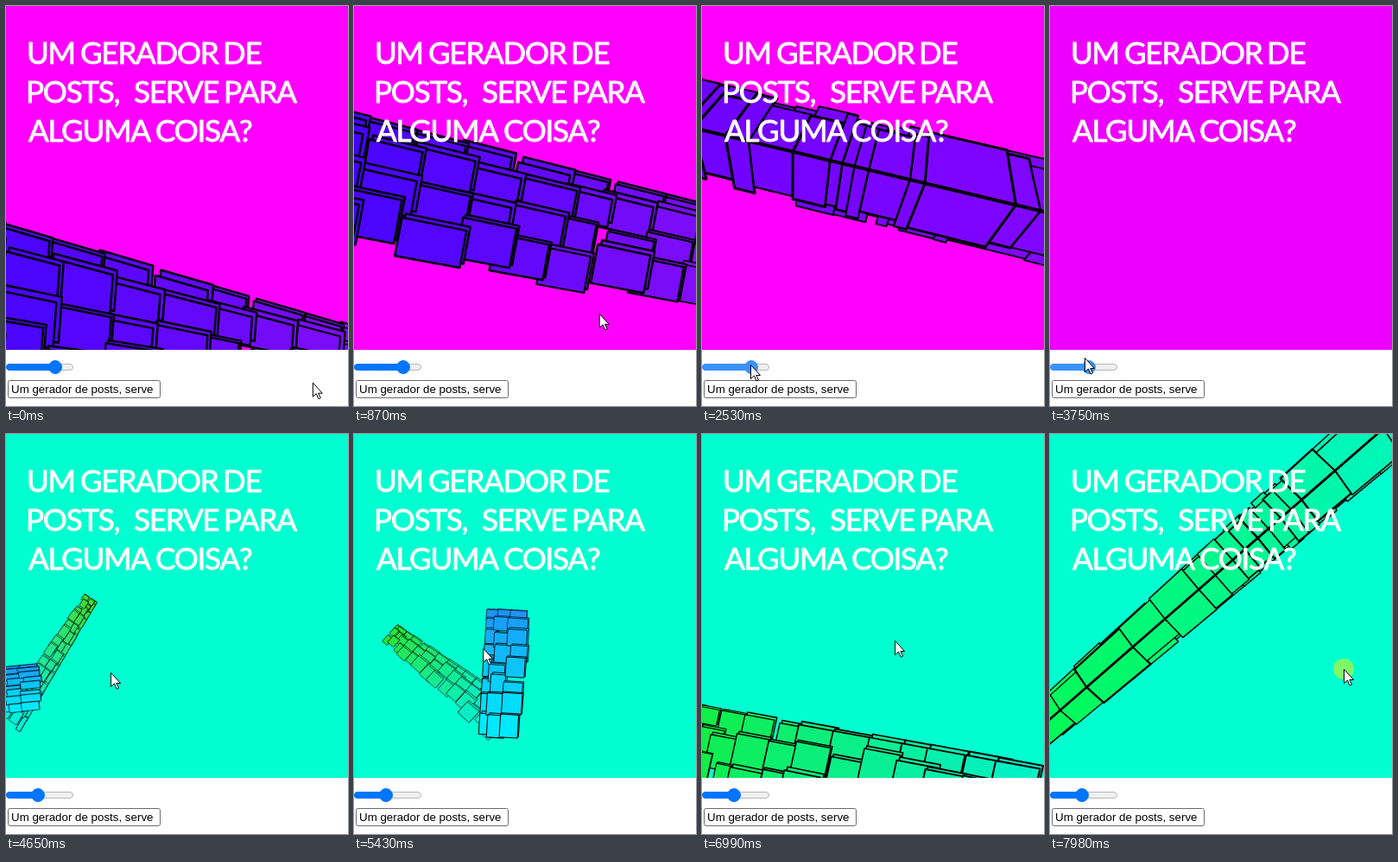
Write an HTML page with a canvas that moves like this. It is 396 by 463 pixels and loops after 8000 ms.

```html
<!DOCTYPE html>
<html lang="pt">
<head>
<meta charset="utf-8">
<title>Gerador de posts</title>
<style>
  html, body { margin: 0; width: 100%; height: 100%; overflow: hidden; background: #fff; }
  canvas { display: block; }
</style>
</head>
<body>
<canvas id="stage" width="396" height="463"></canvas>
<script>
const ctx = document.getElementById('stage').getContext('2d');
const LOOP = 8000, W = 396, H = 398;

const mix = (a, b, k) => a + (b - a) * k;
const mixAll = (a, b, k) => a.map((v, i) => mix(v, b[i], k));
const clamp = (v, lo = 0, hi = 1) => Math.min(hi, Math.max(lo, v));
const ramp = (t, from, to) => clamp((t - from) / (to - from));
const rgb = c => `rgb(${c.map(Math.round)})`;
const rng = s => () => (s = s * 16807 % 2147483647) / 2147483647;

// Keys are [time, ...values]; values are interpolated linearly.
function at(keys, t) {
  const next = keys.findIndex(k => k[0] > t);
  const b = next < 0 ? keys[keys.length - 1] : keys[next];
  const a = next < 0 ? b : keys[Math.max(0, next - 1)];
  return mixAll(a, b, a === b ? 0 : ramp(t, a[0], b[0])).slice(1);
}

function poly(points, fill, width) {
  ctx.beginPath();
  points.forEach(p => ctx.lineTo(...p));
  ctx.closePath();
  ctx.fillStyle = fill;
  ctx.fill();
  ctx.lineWidth = width;
  ctx.strokeStyle = '#000';
  ctx.stroke();
}

// Maps (along, across) to the stage; a pose is an edge and the face width at both ends.
function plane([x0, y0, x1, y1, w0, w1], fan = 0) {
  const length = Math.hypot(x1 - x0, y1 - y0);
  const ax = (x1 - x0) / length, ay = (y1 - y0) / length;
  return (u, v) => {
    const across = mix(w0, w1, u) * v;
    const lean = Math.abs(across) * fan * (0.5 - u);
    return [
      mix(x0, x1, u) - ay * across + ax * lean,
      mix(y0, y1, u) + ax * across + ay * lean
    ];
  };
}

// Wall of jittered boxes that shrink with distance.
function wall(pose, cols, rows, from, to, seed) {
  const rnd = rng(seed), toStage = plane(pose);
  const spread = x => 1 - (1 - clamp(x, -0.1)) ** 1.25;
  const point = (x, y) => toStage(spread(x), spread(y));
  for (let r = rows - 1; r >= 0; r--) {
    for (let c = cols - 1; c >= 0; c--) {
      const x = (c + (rnd() - 0.5) * 0.4) / cols;
      const y = (r + (rnd() - 0.5) * 0.5) / rows;
      const x2 = x + (1 + rnd() * 0.25) / cols;
      const y2 = y + (1 + rnd() * 0.25) / rows;
      const face = [point(x, y), point(x2, y), point(x2, y2), point(x, y2)];
      const size = Math.hypot(face[1][0] - face[0][0], face[1][1] - face[0][1]);
      const lift = size * (0.04 + rnd() * 0.06);
      const back = face.map(p => [p[0] + lift, p[1] - lift]);
      const color = rgb(mixAll(from, to, c / (cols - 1)));
      const line = clamp(size * 0.04, 0.6, 2.5);
      poly(back, color, line);
      poly(face, color, line);
    }
  }
}

// Row of blocks seen on its edge: two faces that share a ridge.
function beam(pose, fan, widest, from, to, seed, line) {
  const rnd = rng(seed), point = plane(pose, fan);
  const cuts = [-0.2];
  while (cuts[cuts.length - 1] < 1.2) {
    cuts.push(cuts[cuts.length - 1] + mix(0.03, widest, rnd() ** 2));
  }
  const block = (a, b, low, high, width) => {
    const color = rgb(mixAll(from, to, clamp((a + b) / 2)));
    for (const side of [-1, 1]) {
      const v = side * mix(low, high, rnd());
      poly([point(a, 0), point(b, 0), point(b, v), point(a, v)], color, width);
    }
  };
  const half = widest / 2;
  cuts.slice(1).forEach((b, i) => block(cuts[i] + half, b + half, 0.9, 1.12, line * 0.7));
  cuts.slice(1).forEach((b, i) => block(cuts[i], b, 0.85, 1.08, mix(0.6, 1.2, rnd()) * line));
  ctx.beginPath();
  ctx.moveTo(...point(-0.2, 0));
  ctx.lineTo(...point(1.2, 0));
  ctx.lineWidth = line * 1.4;
  ctx.stroke();
}

// Time, edge start, edge end, width at start and end.
const violetWall = [
  [430, -90, 440, 440, 480, -205, -92],
  [900, -80, 250, 440, 350, -145, -115]
];
const violetBeam = [
  [900, 0, 168, 396, 285, 54, 52],
  [1430, 0, 131, 396, 264, 55, 58],
  [3090, 0, 150, 396, 225, 52, 54],
  [3530, -620, 70, -170, 150, 40, 40]
];
const greenArm = [
  [4650, -8, 326, 92, 186, 30, 16],
  [6090, 302, 375, -15, 283, 62, 30],
  [6990, 460, 520, -40, 410, 118, 100]
];
const blueArm = [
  [4650, 42, 318, 37, 266, -47, -52],
  [6090, 320, 378, 341, 154, -50, -45],
  [6990, 480, 520, 540, 150, -50, -80]
];
const greenBeam = [
  [7300, 0, 340, 396, 420, 45, 50],
  [7980, 0, 330, 396, -15, 24, 36]
];
const pointer = [
  [0, 356, 436], [200, 324, 381], [1430, 252, 335], [2500, 57, 415], [3090, 57, 415],
  [3750, 41, 407], [4190, 34, 408], [4650, 122, 276], [6090, 174, 224],
  [6990, 224, 239], [7980, 341, 272]
];

function drawScene(t) {
  ctx.fillStyle = `hsl(${mix(300, 169, ramp(t, 3740, 4100))} 100% 50%)`;
  ctx.fillRect(0, 0, W, H);
  if (t < 900) {
    wall(at(violetWall, t), 10, 4, [68, 4, 254], [138, 14, 246], 77);
  } else if (t < 3530) {
    beam(at(violetBeam, t), 1, 0.28, [112, 2, 255], [128, 6, 255], 12, 2.8);
  } else if (t >= 4190 && t < 7300) {
    const far = mixAll([70, 218, 45], [18, 238, 60], ramp(t, 4650, 6090));
    wall(at(greenArm, t), 14, 3, [0, 240, 222], far, 41);
    wall(at(blueArm, t), 8, 3, [0, 232, 252], [28, 148, 246], 93);
  } else if (t >= 7300) {
    beam(at(greenBeam, t), 0.3, 0.16, [0, 250, 88], [0, 246, 192], 58, 2);
  }
}

// Each word is placed by the left edge of its ink.
function drawTitle() {
  const lines = [
    { UM: 26, GERADOR: 87, DE: 254 },
    { 'POSTS,': 26, SERVE: 149, PARA: 255 },
    { ALGUMA: 26, 'COISA?': 174 }
  ];
  ctx.font = '400 35px Lato, sans-serif';
  ctx.letterSpacing = '-1.2px';
  ctx.fillStyle = ctx.strokeStyle = '#fff';
  ctx.lineWidth = 0.9;
  lines.forEach((line, i) => {
    for (const [word, left] of Object.entries(line)) {
      const x = left + ctx.measureText(word).actualBoundingBoxLeft, y = 67 + i * 45;
      ctx.fillText(word, x, y);
      ctx.strokeText(word, x, y);
    }
  });
  ctx.letterSpacing = '0px';
}

function pill(x, y, w, h, r, fill, stroke = fill) {
  ctx.beginPath();
  ctx.roundRect(x + 0.5, y + 0.5, w - 1, h - 1, r);
  ctx.fillStyle = fill;
  ctx.fill();
  ctx.lineWidth = 1;
  ctx.strokeStyle = stroke;
  ctx.stroke();
}

function drawControls(t) {
  ctx.fillStyle = '#fff';
  ctx.fillRect(0, H, W, 65);
  const x = mix(57, 37, ramp(t, 3090, 4190));
  const blue = t > 2500 && t < 4190 ? '#3b92ff' : '#0075ff';
  pill(0, 414, 78, 8, 3.5, '#efefef', '#b8b8b8');
  pill(0, 414, x, 8, 3.5, blue);
  pill(x - 8, 410, 16, 16, 7.5, blue);
  pill(2, 433, 177, 21, 2, '#fff', '#6b6b6b');
  ctx.font = '13.333px "Liberation Sans", Arial, sans-serif';
  ctx.fillStyle = '#000';
  ctx.fillText('Um gerador de posts, serve', 6, 448);
}

function drawPointer(t) {
  const [x, y] = at(pointer, t);
  if ((t > 5990 && t < 6770) || t > 7300) {
    ctx.beginPath();
    ctx.arc(x - 1, y, 12, 0, Math.PI * 2);
    ctx.fillStyle = 'rgba(250, 240, 0, 0.5)';
    ctx.fill();
  }
  const arrow = [[0, 0], [0, 16], [4, 12.5], [6.5, 18.5], [9, 17.5], [6.3, 12], [11, 12]];
  poly(arrow.map(p => [x + p[0] - 0.5, y + p[1] + 0.5]), '#fff', 1);
}

function frame(now) {
  const t = now % LOOP;
  ctx.lineJoin = 'round';
  drawScene(t);
  drawTitle();
  drawControls(t);
  drawPointer(t);
  requestAnimationFrame(frame);
}
requestAnimationFrame(frame);
</script>
</body>
</html>
```
